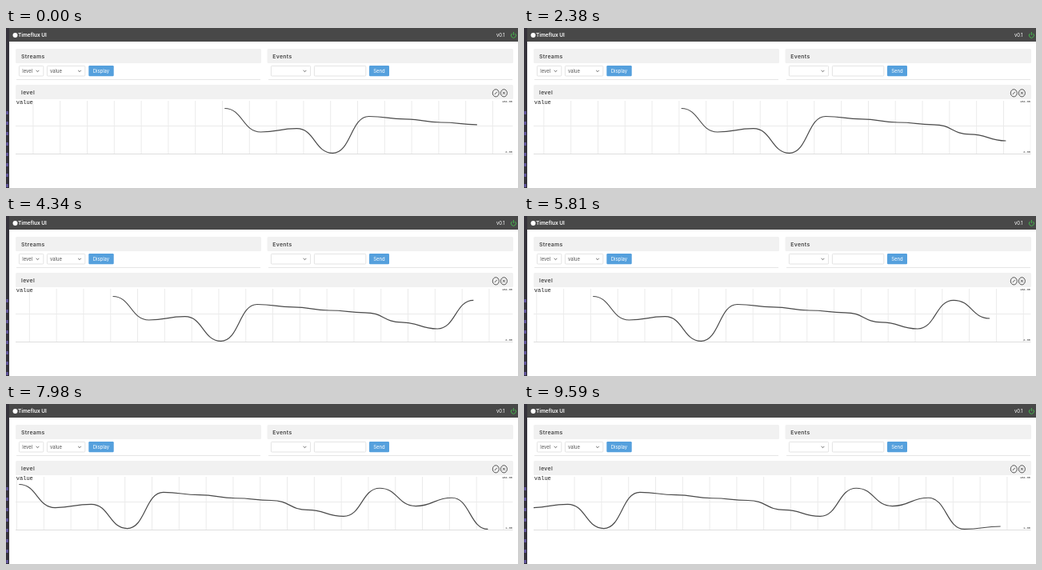
These frames come from a looping animation (640x200 px, 9660 ms). An HTML page:

```html
<!DOCTYPE html>
<html lang="en">
<head>
<meta charset="utf-8">
<title>Stream monitor</title>
<style>
  html, body { margin: 0; width: 100%; height: 100%; overflow: hidden; background: #fff; }
  svg { display: block; width: 640px; height: 200px; }
  text { font: 5.9px Inter, sans-serif; fill: #555; }
  .title { font-size: 6.8px; font-weight: 600; letter-spacing: .35px; fill: #444; }
  .brand { font-size: 6.5px; font-weight: 600; fill: #fff; }
  .mono { font: 7px "Liberation Mono", monospace; fill: #222; }
  .tiny { font-size: 3.6px; }
  .light { fill: #fff; }
  .head { fill: #f1f1f1; }
  .field { fill: #fff; stroke: #dcdcdc; stroke-width: .8; }
  .button { fill: #55a0dd; }
  .line { fill: none; stroke: #4a4a4a; stroke-width: 1.2; }
  .chevron { fill: none; stroke: #555; stroke-width: .9; }
  .icon { fill: none; stroke: #444; stroke-width: .9; }
</style>
</head>
<body>
<svg viewBox="0 0 640 200">
  <defs>
    <clipPath id="chartArea"><path d="M12 90H633.5V158H12Z"/></clipPath>
    <path id="chevron" class="chevron" d="M-1.8 -.9L0 .9L1.8 -.9"/>
  </defs>

  <!-- Window edge and top bar -->
  <rect width="4" height="200" fill="#35323b"/>
  <path d="M1.5 104V200" stroke="#6658a8" stroke-width="2.4" stroke-dasharray="4 9"/>
  <rect x="4" width="636" height="17" fill="#484848"/>
  <circle cx="11.5" cy="9" r="3" fill="#fff"/>
  <text class="brand" x="15" y="11.3">Timeflux UI</text>
  <text class="light" x="613" y="11.2">v0.1</text>
  <path d="M632.6 6.9A3 3 0 1 0 636.2 6.9M634.4 5V9" fill="none" stroke="#45b34c"/>

  <!-- Panels -->
  <path d="M13 64.5H318M328 64.5H633" stroke="#e6e6e6"/>
  <rect class="head" x="12" y="26" width="307" height="18" rx="1.5"/>
  <rect class="head" x="326.5" y="26" width="307.5" height="18" rx="1.5"/>
  <rect class="head" x="12" y="71" width="622" height="18" rx="1.5"/>
  <text class="title" x="19" y="37.7">Streams</text>
  <text class="title" x="333.3" y="37.7">Events</text>
  <text class="title" x="19" y="82.8">level</text>

  <!-- Controls -->
  <rect class="field" x="16.4" y="47.4" width="30.4" height="12.6" rx="1"/>
  <rect class="field" x="51.4" y="47.4" width="47.4" height="12.6" rx="1"/>
  <rect class="field" x="331.4" y="47.4" width="49.2" height="12.6" rx="1"/>
  <rect class="field" x="385.4" y="47.4" width="64.4" height="12.6" rx="1"/>
  <rect class="button" x="103.3" y="47" width="31.4" height="13.3" rx="1.2"/>
  <rect class="button" x="454" y="47" width="25" height="13.3" rx="1.2"/>
  <text x="20.3" y="55.8">level</text>
  <text x="55" y="55.8">value</text>
  <text class="light" x="108.8" y="55.8">Display</text>
  <text class="light" x="459.3" y="55.8">Send</text>
  <use href="#chevron" x="39.5" y="53.8"/>
  <use href="#chevron" x="92" y="53.8"/>
  <use href="#chevron" x="373.5" y="53.8"/>
  <g class="icon">
    <ellipse cx="612.3" cy="81.3" rx="4" ry="4.6"/>
    <ellipse cx="622.4" cy="81.3" rx="4" ry="4.6"/>
    <path d="M610.8 83L613.8 79.8M621 79.8L623.8 82.8M623.8 79.8L621 82.8"/>
  </g>

  <!-- Chart -->
  <g clip-path="url(#chartArea)">
    <path id="grid" fill="none" stroke="#ebebeb"/>
    <path d="M12 122.5H634" stroke="#ebebeb"/>
    <path d="M12 157.5H634" stroke="#dedede"/>
    <path id="curve" class="line"/>
  </g>
  <text class="mono" x="12.8" y="95.3">value</text>
  <text class="mono tiny" x="633" y="93.2" text-anchor="end">104.60</text>
  <text id="minimum" class="mono tiny" x="633" y="156.3" text-anchor="end">2.60</text>
</svg>
<script>
const LOOP = 9660, STEP = 70, SPEED = 0.0322;
const SAMPLE = 1400, FIRST_ARRIVAL = 420, START_X = 273.3;
const GRID_GAP = 33.8, GRID_START = 33.9;
const TOP = 100.5, RESCALE_TIME = 7420;
const samples = [100.5, 130, 125.7, 156.4, 110.5, 113.8, 118, 120.8,
                 132.8, 141, 105.3, 128, 117.5, 157.3, 153.8];
const byId = id => document.getElementById(id);
const grid = byId("grid"), curve = byId("curve"), minimum = byId("minimum");

function gridPath(shift) {
  let path = "";
  const first = ((GRID_START - shift) % GRID_GAP + GRID_GAP) % GRID_GAP;
  for (let x = first; x < 634; x += GRID_GAP) path += `M${x} 91V157`;
  return path;
}

function curvePath(time, shift) {
  const count = 8 + Math.floor((time - FIRST_ARRIVAL) / SAMPLE) + 1;
  const scale = time < RESCALE_TIME ? 1 : 0.985;
  const gap = SAMPLE * SPEED;
  let path = "";
  samples.slice(0, count).forEach((value, i) => {
    const x = START_X + i * gap - shift;
    const y = TOP + (value - TOP) * scale;
    // Each sample leaves and arrives horizontally.
    const mid = x - gap / 2;
    path += i ? `${mid} ${y} ${x} ${y}` : `M${x} ${y}`;
    if (i < count - 1) path += `C${x + gap / 2} ${y} `;
  });
  return path;
}

function draw() {
  const time = Math.floor(performance.now() % LOOP / STEP) * STEP;
  const shift = time * SPEED;
  grid.setAttribute("d", gridPath(shift));
  curve.setAttribute("d", curvePath(time, shift));
  minimum.textContent = time < RESCALE_TIME ? "2.60" : "1.60";
  requestAnimationFrame(draw);
}
draw();
</script>
</body>
</html>
```
